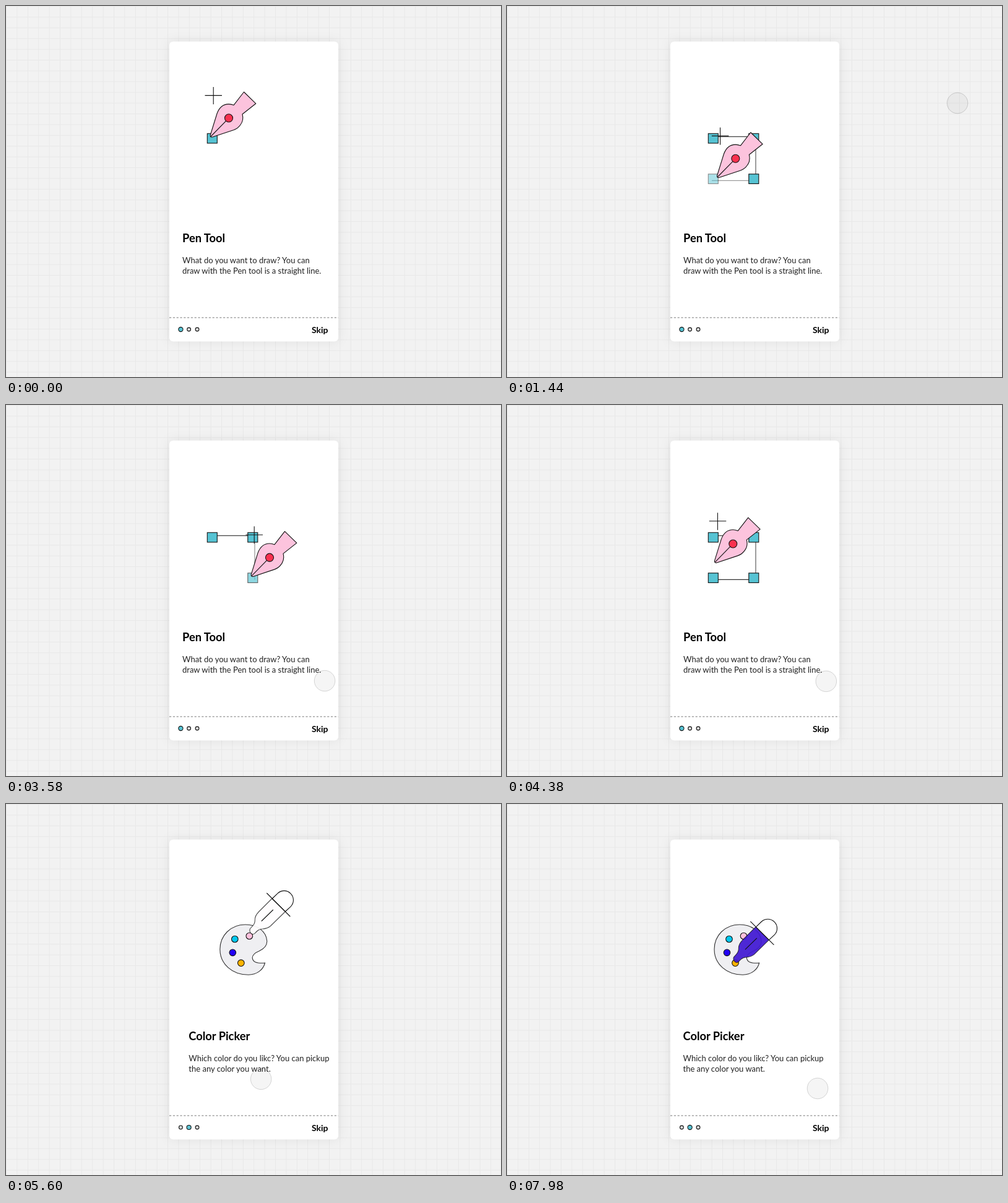
These frames come from a looping animation (800x600 px, 8 s). An HTML page:

```html
<!DOCTYPE html>
<html lang="en">
<head>
<meta charset="utf-8">
<title>Onboarding</title>
<style>
  html, body { margin: 0; width: 100%; height: 100%; overflow: hidden; background: #f2f2f2; }
  svg { display: block; width: 800px; height: 600px; }
  text { font-family: Lato, "Open Sans", sans-serif; font-size: 13px; fill: #222; }
  .title { font-size: 18.3px; font-weight: 700; fill: #000; }
  .skip { font-size: 14px; font-weight: 700; fill: #000; }
  .ink { stroke: #111; stroke-width: 1.1; }
  .none { fill: none; }
  .card { fill: #fff; filter: drop-shadow(0 0 9px rgba(0, 0, 0, .07)); }
</style>
</head>
<body>
<svg viewBox="0 0 800 600">
  <defs>
    <pattern id="grid" width="17.4" height="17.4" patternUnits="userSpaceOnUse">
      <path d="M0 .5H17.4M.5 0V17.4" stroke="#e8e8e8" fill="none"/>
    </pattern>
    <clipPath id="screen"><rect x="264" y="57.5" width="273" height="485" rx="6"/></clipPath>
    <rect id="anchor" width="16" height="15.6" fill="#56c3d3" class="ink"/>
  </defs>

  <rect width="800" height="600" fill="#f2f2f2"/>
  <rect width="800" height="600" fill="url(#grid)"/>
  <rect class="card" x="264" y="57.5" width="273" height="485" rx="6"/>

  <g clip-path="url(#screen)">
    <g id="slides">
      <g>
        <g class="ink none">
          <path id="top" d="M331 211.3H402"/>
          <path id="right" d="M402 211V282.5" stroke-opacity=".75"/>
          <path id="bottom" d="M402 282.4H331" stroke-opacity=".85"/>
          <path id="left" d="M331 282.5V211" stroke-opacity=".8"/>
        </g>
        <use href="#anchor" x="325.3" y="206.3"/>
        <use href="#anchor" id="topRight" x="390.8" y="206.3"/>
        <use href="#anchor" id="bottomRight" x="390.8" y="271.8"/>
        <use href="#anchor" id="bottomLeft" x="325.3" y="271.8"/>
        <g id="pen" class="ink" stroke-linejoin="round">
          <path class="none" d="M321.5 144.6H349M335.2 131V159"/>
          <path fill="#fcc3dd" d="M330.3 208.5L341 174C345 163 352 158.6 360 158.6Q364 158.6 368 160.3L384.5 139L403.8 157.8L382 175Q384.5 185 379 192Q375 198 368 200.5L334 211.8Q329.5 212.8 330.3 208.5Z"/>
          <path class="none" d="M331 211L360 181.3"/>
          <circle cx="360" cy="181.3" r="6.5" fill="#f9304f"/>
        </g>
        <text class="title" x="285" y="381.5">Pen Tool</text>
        <text x="285" y="416">What do you want to draw? You can</text>
        <text x="285" y="433">draw with the Pen tool is a straight line.</text>
      </g>

      <g transform="translate(273)">
        <path class="ink" stroke-opacity=".85" fill="#efeff2" d="M411 222C410 205 394 195 376 195C352 195 335 213 335 235C335 259 355 276.3 381 276.3C395 276 405 268 407.7 257Q402 257.5 397 257Q388 256 387.3 248.5Q388 242 398 238Q411 232 411 222Z"/>
        <g class="ink">
          <circle cx="359" cy="218.5" r="5.3" fill="#00c8ee"/>
          <circle cx="382.5" cy="213.5" r="5.3" fill="#ffc0dc"/>
          <circle cx="355.5" cy="240.3" r="5.3" fill="#2200f5"/>
          <circle cx="369" cy="257.2" r="5.3" fill="#ffb400"/>
        </g>
        <g id="picker" class="ink" stroke-linejoin="round">
          <path id="ink" fill-opacity=".93" stroke-opacity=".75" d="M395 161L374 182Q367 189 367.5 196Q367.5 201 364 205L359.5 210Q358 215.5 363 218.2Q366 219.5 368.5 216L371 213.5Q375 210 380 210Q388 209.5 393 205L416.5 182Z"/>
          <path class="none" d="M386.5 152L424.5 190M395.5 161L404.4 152.4A15 15 0 0 1 425.6 173.6L416.5 182M397 179L378 197.5"/>
        </g>
        <text class="title" x="284.5" y="381.5">Color Picker</text>
        <text x="284.5" y="416">Which color do you likc? You can pickup</text>
        <text x="284.5" y="433">the any color you want.</text>
      </g>
    </g>

    <path d="M264 504H537" stroke="#777" stroke-width="1.2" stroke-dasharray="3.2 2.6"/>
    <g class="ink">
      <circle id="dot0" cx="282.4" cy="523"/>
      <circle id="dot1" cx="295.6" cy="523"/>
      <circle cx="309" cy="523" r="2.9" fill="#ddd"/>
    </g>
    <text class="skip" x="494" y="529">Skip</text>
  </g>

  <circle id="cursor" stroke="#000" stroke-opacity=".2" stroke-width=".8"/>
</svg>

<script>
const LOOP = 8000, WIDTH = 273;
const $ = id => document.getElementById(id);
const clamp = v => Math.min(1, Math.max(0, v));
const easeOut = v => 1 - (1 - clamp(v)) ** 3;
const smooth = v => v * v * (3 - 2 * v);
const mix = (a, b, p) => a + (b - a) * p;
const mixAll = (a, b, p) => a.map((v, i) => mix(v, b[i], p));
const move = (id, x, y) => $(id).setAttribute("transform", `translate(${x} ${y})`);
const rgb = c => `rgb(${c.map(Math.round)})`;
const set = (id, attrs) => {
  for (const name in attrs) $(id).setAttribute(name, attrs[name]);
};

// Time, x, y
const cursorPath = [
  [840, 769, -18], [1420, 728, 157], [1700, 728, 157], [2480, 525, 425],
  [2860, 525, 425], [3300, 515, 446], [4780, 516, 447], [5230, 410, 447],
  [5800, 413, 444], [6640, 413, 444], [7700, 502, 460]
];
const DRAG = 4780, DROP = 5230;

function cursorAt(t) {
  const next = cursorPath.findIndex(k => k[0] > t);
  if (next === 0) return [769, -40];
  if (next < 0) return cursorPath.at(-1).slice(1);
  const a = cursorPath[next - 1], b = cursorPath[next];
  return mixAll(a, b, smooth((t - a[0]) / (b[0] - a[0]))).slice(1);
}

const corners = [[0, 0], [66, 0], [66, 65.5], [8, 65.5], [0, 0]];
const edges = [["top", "topRight"], ["right", "bottomRight"], ["bottom", "bottomLeft"], ["left"]];
const PEN_START = 57, PEN_LOOP = 2625, STEP = 549;

function drawPen(t) {
  const phase = Math.max(0, Math.min(t, 5300) - PEN_START) % PEN_LOOP;
  const side = Math.min(3, Math.floor(phase / STEP));
  const pos = mixAll(corners[side], corners[side + 1], easeOut((phase - side * STEP) / 400));
  move("pen", ...pos);
  const fadeOut = 1 - easeOut((phase - 4 * STEP) / 460);
  edges.forEach((ids, i) => {
    const opacity = clamp((phase - i * STEP) / 460) ** 1.5 * fadeOut;
    ids.forEach(id => set(id, { opacity }));
  });
}

const PINK = [255, 196, 222];
const picks = [
  { at: 5500, pos: [24, -8], color: PINK },
  { at: 6280, pos: [0, 0], color: [0, 200, 238] },
  { at: 7000, pos: [-7, 24], color: [34, 0, 245] },
  { at: 7750, pos: [8, 39], color: [255, 180, 0] }
];

function drawPicker(t) {
  let pos = picks[0].pos, color = [255, 255, 255];
  for (const pick of picks) {
    pos = mixAll(pos, pick.pos, easeOut((t - pick.at) / 400));
    color = mixAll(color, pick.color, clamp((t - pick.at) / 620) ** 2);
  }
  move("picker", ...pos);
  set("ink", { fill: rgb(color) });
}

function drawDot(id, active) {
  set(id, { r: mix(2.9, 3.6, active), fill: rgb(mixAll([221, 221, 221], [86, 195, 211], active)) });
}

function draw(t) {
  const [x, y] = cursorAt(t);
  const press = clamp((t - 4730) / 60) * clamp((5300 - t) / 70);
  set("cursor", { cx: x, cy: y, r: mix(16.8, 15.8, press), "fill-opacity": mix(.04, .09, press) });

  let scroll = 0;
  if (t > DROP) scroll = mix(106, WIDTH, easeOut((t - DROP) / 620));
  else if (t > DRAG) scroll = 516 - x;
  move("slides", -scroll, 0);
  const page = clamp((scroll - 60) / (WIDTH - 60));
  drawDot("dot0", 1 - page);
  drawDot("dot1", page);

  drawPen(t);
  drawPicker(t);
}

const start = performance.now();
function tick() {
  draw((performance.now() - start) % LOOP);
  requestAnimationFrame(tick);
}
tick();
</script>
</body>
</html>
```
